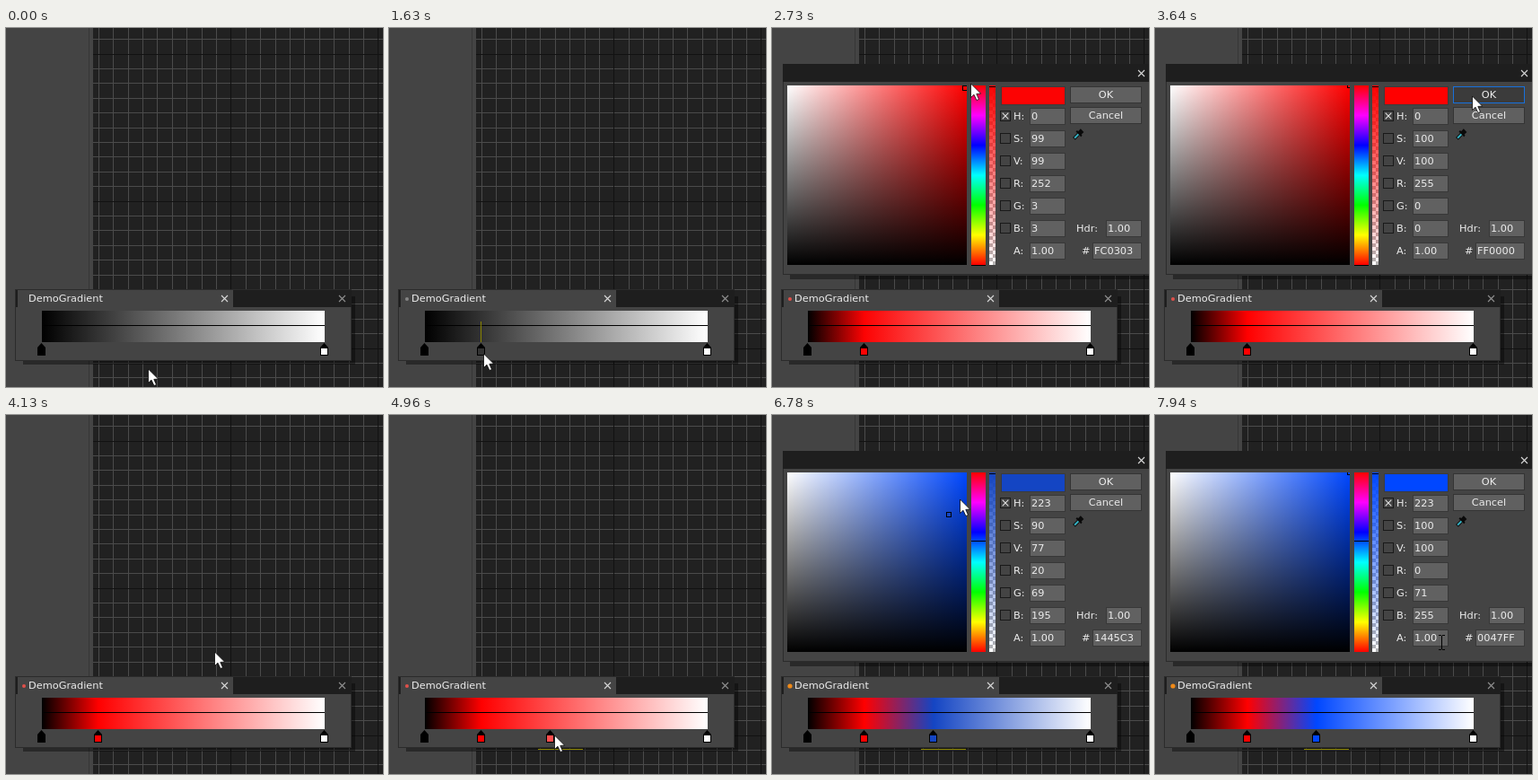
An HTML page with a canvas that plays this animation: 420 px wide and 400 px high, repeating every 8 s.

```html
<!DOCTYPE html>
<html lang="en">
<head>
<meta charset="utf-8">
<title>Gradient editor</title>
<style>
html, body { margin: 0; width: 100%; height: 100%; overflow: hidden; background: #212121; }
canvas { display: block; width: 420px; height: 400px; }
</style>
</head>
<body>
<canvas id="stage" width="420" height="400"></canvas>
<script>
const LOOP = 8000, LAG = 50;
const g = document.getElementById('stage').getContext('2d');

// Pointer path: time, x, y. Repeated points are pauses.
const PATH = [
  [0, 158, 379], [20, 158, 379], [350, 118, 357], [560, 99, 347], [690, 105, 345],
  [1240, 105, 345], [1440, 105, 362], [1870, 105, 362], [2350, 165, 137],
  [2580, 207, 82], [2720, 219, 62], [2930, 260, 41], [3110, 260, 41],
  [3350, 353, 75], [3690, 353, 75], [4380, 181, 343], [4510, 181, 343],
  [4730, 181, 348], [4870, 181, 348], [4960, 184, 356], [5100, 178, 361],
  [5700, 178, 361], [6200, 228, 165], [6380, 230, 140], [6440, 230, 140],
  [6620, 186, 132], [6730, 196.6, 111.2], [6780, 209, 93], [6930, 220, 62],
  [7300, 239, 42], [7330, 239, 42], [7940, 319, 253], [8000, 319, 253]
];
const ADD_1 = 950, ADD_2 = 4600;
const OPEN_1 = 1680, PRESS_OK = 3590, CLOSE_1 = 3690, OPEN_2 = 5490;
const SV_1 = [2580, 2880], HUE_2 = [6260, 6400], SV_2 = [6620, 7100];
const SV = { x: 17, y: 64, size: 200 };
const KEY_1 = 103, KEY_2 = 180, BAR_L = 40, BAR_R = 355;
const GUIDE = '#8a8400';

const clamp = (v, lo, hi) => Math.min(hi, Math.max(lo, v));
const same = (a, b) => a[1] === b[1] && a[2] === b[2];
const css = c => `rgb(${c.join(',')})`;
const hex = c => c.map(v => v.toString(16).padStart(2, '0')).join('').toUpperCase();

function slope(i, axis) {
  const a = PATH[i - 1], p = PATH[i], b = PATH[i + 1];
  if (!a || !b || same(a, p) || same(p, b)) return 0;
  return (b[axis] - a[axis]) / (b[0] - a[0]);
}

function pointer(t) {
  let i = 0;
  while (i < PATH.length - 2 && t >= PATH[i + 1][0]) i++;
  const a = PATH[i], b = PATH[i + 1], d = b[0] - a[0], u = clamp((t - a[0]) / d, 0, 1);
  const u2 = u * u, u3 = u2 * u;
  return [1, 2].map(k =>
    (2 * u3 - 3 * u2 + 1) * a[k] + (u3 - 2 * u2 + u) * d * slope(i, k) +
    (3 * u2 - 2 * u3) * b[k] + (u3 - u2) * d * slope(i + 1, k));
}

function hsvToRgb([h, s, v]) {
  return [5, 3, 1].map(n => {
    const k = (n + h / 60) % 6;
    return Math.round(255 * v * (1 - s * clamp(Math.min(k, 4 - k), 0, 1)));
  });
}

// Saturation and value picked by the drag, or the start colour before it.
function dragSV(t, [from, to], start) {
  const at = t - LAG;
  if (at < from) return start;
  const [x, y] = pointer(Math.min(at, to));
  return [clamp((x - SV.x) / SV.size, 0, 1), clamp(1 - (y - SV.y) / SV.size, 0, 1)];
}

function dragHue(t) {
  if (t < HUE_2[0]) return 0;
  return (264 - pointer(Math.min(t, HUE_2[1]))[1]) * 1.8;
}

function box(x, y, w, h, fill) {
  g.fillStyle = fill;
  g.fillRect(x, y, w, h);
}

function frame(x, y, w, h, fill, edge) {
  box(x, y, w, h, edge);
  box(x + 1, y + 1, w - 2, h - 2, fill);
}

function text(s, x, y, align = 'left') {
  g.font = '8.5pt "DejaVu Sans", sans-serif';
  g.textAlign = align;
  g.fillStyle = '#ececec';
  g.fillText(s, x, y);
}

function cross(x, y, r, color) {
  g.strokeStyle = color;
  g.lineWidth = 1.1;
  g.beginPath();
  g.moveTo(x - r, y - r); g.lineTo(x + r, y + r);
  g.moveTo(x + r, y - r); g.lineTo(x - r, y + r);
  g.stroke();
}

function poly(points, fill) {
  g.fillStyle = fill;
  g.beginPath();
  points.forEach(([x, y]) => g.lineTo(x, y));
  g.closePath();
  g.fill();
}

function ramp(x0, y0, x1, y1, stops) {
  const r = g.createLinearGradient(x0, y0, x1, y1);
  stops.forEach(([p, c]) => r.addColorStop(p, c));
  return r;
}

function drawBackdrop() {
  box(0, 0, 420, 400, '#212121');
  const step = 16.4;
  for (const major of [false, true]) {
    for (let i = -12; i < 25; i++) {
      if ((i % 10 === 0) !== major) continue;
      const color = major ? '#121212' : '#4b4b4b';
      box(Math.floor(250.9 + i * step), 0, 1, 400, color);
      box(0, Math.floor(29.1 + i * step), 420, 1, color);
    }
  }
  box(0, 0, 97, 400, '#444');
  box(92, 0, 1, 400, '#363636');
}

function drawKey(x, color) {
  const mid = x - 0.5;
  poly([[mid - 4.5, 356], [mid, 351], [mid + 4.5, 356]], '#000');
  frame(x - 5, 356, 9, 9, color, '#000');
}

function drawEditor(t, keys) {
  box(19, 370, 370, 5, 'rgba(0,0,0,.4)');
  box(385, 299, 4, 71, 'rgba(0,0,0,.4)');
  frame(10, 291, 375, 80, '#444', '#2b2b2b');
  box(11, 292, 374, 19, '#1e1e1e');
  box(13, 292, 240, 19, '#444');
  if (t >= ADD_1) {
    g.fillStyle = t < SV_1[0] + LAG ? '#858585' : t < HUE_2[0] ? '#e0504a' : '#f08a18';
    g.beginPath();
    g.arc(20, 302, t < HUE_2[0] ? 2 : 2.6, 0, 7);
    g.fill();
  }
  text('DemoGradient', 25, 305);
  cross(243.5, 301.5, 3.5, '#d8d8d8');
  cross(374.5, 301.5, 3.5, '#909090');

  const stops = keys.map(([x, c]) => [(x - BAR_L) / (BAR_R - BAR_L), css(c)]);
  box(BAR_L, 315, BAR_R - BAR_L, 35, ramp(BAR_L, 0, BAR_R, 0, stops));
  box(BAR_L, 331, BAR_R - BAR_L, 1, '#000');
  if (t >= ADD_1 && t < SV_1[0] + LAG) box(102, 327, 1, 23, GUIDE);
  if (t >= ADD_2) box(166, 372, 50, 1, GUIDE);
  keys.forEach(([x, c]) => drawKey(x, css(c)));
}

function field(x, y, w, value) {
  frame(x, y, w, 19, '#616161', '#383838');
  text(value, x + 2, y + 13);
}

function button(label, y, state) {
  const fill = { idle: '#606060', hover: '#6c6c6c', down: '#3b3b3b' }[state];
  frame(332, y, 80, 19, fill, state === 'down' ? '#1770dc' : '#343434');
  text(label, 372, y + 13, 'center');
}

function drawPipette() {
  g.save();
  g.translate(341, 118);
  g.rotate(Math.PI / 4);
  box(-2, -6, 5, 5, '#0a0a0a');
  box(-3.5, -2, 8, 2, '#0a0a0a');
  box(-1.5, 0, 4, 7, '#111');
  box(-0.5, 0, 2, 6, '#35b4c6');
  g.restore();
}

function drawPicker(t, hsv, [mx, my]) {
  const [h, s, v] = hsv, rgb = hsvToRgb(hsv);
  box(20, 275, 400, 5, 'rgba(0,0,0,.4)');
  frame(12, 40, 410, 235, '#444', '#2b2b2b');
  box(12, 40, 408, 20, '#1e1e1e');
  cross(411.5, 50.5, 3.5, '#d8d8d8');

  const { x, y, size } = SV;
  box(x, y, size, size, css(hsvToRgb([h, 1, 1])));
  box(x, y, size, size, ramp(x, 0, x + size, 0, [[0, '#fff'], [1, 'rgba(255,255,255,0)']]));
  box(x, y, size, size, ramp(0, y, 0, y + size, [[0, 'rgba(0,0,0,0)'], [1, '#000']]));
  g.save();
  g.beginPath();
  g.rect(x, y, size, size);
  g.clip();
  g.strokeStyle = '#000';
  g.lineWidth = 1;
  g.strokeRect(Math.round(x + s * size) - 2.5, Math.round(y + (1 - v) * size) - 2.5, 5, 5);
  g.restore();

  const hues = Array.from({ length: 7 }, (_, i) => [i / 6, css(hsvToRgb([360 - i * 60, 1, 1]))]);
  box(222, y, 16, size, ramp(0, y, 0, y + size, hues));
  box(222, Math.round(264 - h / 1.8), 16, 1, '#000');

  for (let i = 0; i < 50; i++) {
    box(242, y + i * 4, 4, 4, i % 2 ? '#fff' : '#b4b4b4');
    box(246, y + i * 4, 3, 4, i % 2 ? '#b4b4b4' : '#fff');
  }
  box(242, y, 7, size, ramp(0, y, 0, y + size, [[0, css(rgb)], [1, `rgba(${rgb},0)`]]));
  box(242, y + 1, 7, 1, '#000');

  frame(255, 65, 72, 21, css(rgb), '#3b3b3b');
  const values = [h, s * 100, v * 100, ...rgb].map(n => String(Math.round(n)));
  [...'HSVRGB', 'A'].forEach((name, i) => {
    const cy = 98 + i * 25;
    if (name !== 'A') frame(254, cy - 6, 12, 12, '#444', '#191919');
    if (i === 0) cross(260, cy, 3.3, '#e0e0e0');
    text(name + ':', 269, cy + 4);
    field(287, cy - 9, 40, name === 'A' ? '1.00' : values[i]);
  });
  text('Hdr:', 339, 227);
  field(372, 214, 40, '1.00');
  text('#', 345, 252);
  field(357, 239, 55, hex(rgb));

  const over = mx >= 332 && mx < 412 && my >= 65 && my < 84;
  button('OK', 65, !over ? 'idle' : t >= PRESS_OK && t < CLOSE_1 ? 'down' : 'hover');
  button('Cancel', 88, 'idle');
  drawPipette();
}

function drawArrow(x, y) {
  g.save();
  g.translate(x, y + 0.5);
  const shape = [[.5, .5], [.5, 16], [4, 12.7], [6.9, 19], [9.5, 17.9], [6.8, 11.9], [11.6, 11.6]];
  poly(shape, '#fff');
  g.strokeStyle = 'rgba(0,0,0,.75)';
  g.lineWidth = 1;
  g.stroke();
  g.restore();
}

function drawBeam(x, y) {
  box(x, y - 7, 1, 15, '#000');
  for (const dy of [-8, 8]) {
    box(x - 3, y + dy, 3, 1, '#000');
    box(x + 1, y + dy, 3, 1, '#000');
  }
}

function draw(t) {
  const [mx, my] = pointer(t).map(Math.round);
  const hsv1 = [0, ...dragSV(t, SV_1, [0, .2])];
  const hsv2 = [dragHue(t), ...dragSV(t, SV_2, [.694, 1])];
  const keys = [[BAR_L, [0, 0, 0]]];
  if (t >= ADD_1) keys.push([KEY_1, hsvToRgb(hsv1)]);
  if (t >= ADD_2) keys.push([KEY_2, hsvToRgb(hsv2)]);
  keys.push([BAR_R, [255, 255, 255]]);

  drawBackdrop();
  drawEditor(t, keys);
  const second = t >= OPEN_2, open = second || (t >= OPEN_1 && t < CLOSE_1);
  if (open) drawPicker(t, second ? hsv2 : hsv1, [mx, my]);

  const row = (my - 89) % 25;
  const inField = open && mx >= 287 && mx < 327 && my >= 89 && my < 258 && row < 19;
  (inField ? drawBeam : drawArrow)(mx, my);
}

const start = performance.now();
function tick() {
  draw((performance.now() - start) % LOOP);
  requestAnimationFrame(tick);
}
tick();
</script>
</body>
</html>
```
